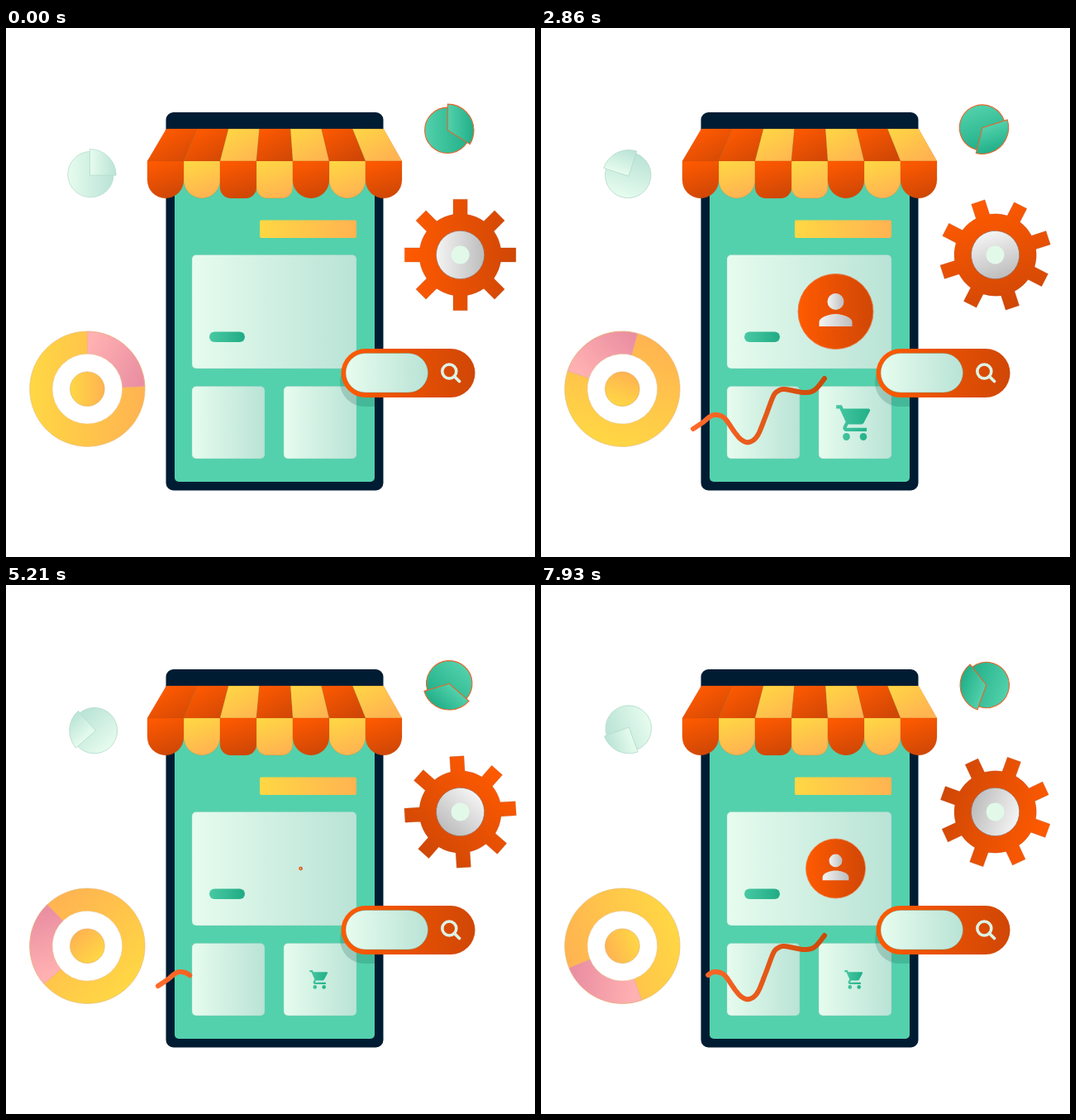
Write an HTML page with a canvas that moves like this. It is 640 px wide and 640 px high and loops after 8 s.

```html
<!DOCTYPE html>
<html lang="en">
<head>
<meta charset="utf-8">
<title>Mobile shop</title>
<style>
html, body { margin: 0; width: 100%; height: 100%; overflow: hidden; background: #fff; }
canvas { display: block; width: 640px; height: 640px; }
</style>
</head>
<body>
<canvas id="stage"></canvas>
<script>
const SIZE = 640, LOOP = 8000, FPS = 14;
const ORANGE = ['#ff5a00', '#d04706'];
const YELLOW = ['#ffd744', '#ffb351'];
const MINT = ['#e6fcee', '#b9e3d6'];
const GREEN = ['#52d1ab', '#1fae87'];
const PINK = ['#ffb0b1', '#ea8fa2'];
const GREY = ['#f4f4f4', '#bdbdbd'];

const canvas = document.getElementById('stage');
const ctx = canvas.getContext('2d');
const dpr = window.devicePixelRatio || 1;
canvas.width = canvas.height = SIZE * dpr;

const rad = deg => deg * Math.PI / 180;
const clamp = u => Math.max(0, Math.min(1, u));
const ease = (t, start, span) => {
  const u = clamp((t - start) / span);
  return u * u * (3 - 2 * u);
};

function grad([from, to], x0, y0, x1, y1) {
  const g = ctx.createLinearGradient(x0, y0, x1, y1);
  g.addColorStop(0, from);
  g.addColorStop(1, to);
  return g;
}

function box(x, y, w, h, r, fill) {
  ctx.beginPath();
  ctx.roundRect(x, y, w, h, r);
  ctx.fillStyle = fill;
  ctx.fill();
}

const boxH = (x, y, w, h, r, colors) => box(x, y, w, h, r, grad(colors, x, 0, x + w, 0));

function disc(x, y, r, fill) {
  ctx.beginPath();
  ctx.arc(x, y, r, 0, Math.PI * 2);
  ctx.fillStyle = fill;
  ctx.fill();
}

const discH = (x, y, r, colors) => disc(x, y, r, grad(colors, x - r, 0, x + r, 0));

function outline(color, width) {
  ctx.strokeStyle = color;
  ctx.lineWidth = width;
  ctx.stroke();
}

function at(x, y, deg, scale, draw) {
  ctx.save();
  ctx.translate(x, y);
  ctx.rotate(rad(deg));
  ctx.scale(scale, scale);
  draw();
  ctx.restore();
}

function phone() {
  box(193.5, 102, 263, 457.5, 9, '#001c33');
  box(204, 122, 242, 427, 5, '#53d1ac');
  boxH(307, 232.5, 117, 21.5, 2, YELLOW);
}

function card(x, y, w, h) {
  boxH(x, y, w, h, 5, MINT);
  outline('rgba(150,200,185,.6)', 0.6);
}

function awning() {
  for (let i = 0; i < 7; i++) {
    const top = 194 + i * 37.55, low = 171 + i * 44;
    const slant = i === 0 || i % 2 ? ORANGE : YELLOW;
    ctx.beginPath();
    ctx.moveTo(top, 122);
    ctx.lineTo(top + 37.55, 122);
    ctx.lineTo(low + 44, 161);
    ctx.lineTo(low, 161);
    ctx.closePath();
    ctx.fillStyle = grad(slant, top, 122, top + 26, 168);
    ctx.fill();
    outline('rgba(190,75,10,.35)', 0.5);
  }
  for (let i = 0; i < 7; i++) {
    const x = 171 + i * 44, r = i === 2 || i === 3 ? 13 : 22;
    box(x, 161, 44, 45, [0, 0, r, r], grad(i % 2 ? YELLOW : ORANGE, x + 8, 161, x + 22, 206));
    outline('rgba(190,90,20,.35)', 0.5);
  }
}

// Smooth curve through a few points, flattened with running lengths.
const knots = [[184, 485], [196, 477], [204, 470.5], [211, 468], [222, 472], [235, 490],
  [243, 498.5], [252, 501], [262, 493], [272, 469], [281, 445.5], [287, 439], [294, 437],
  [306, 439], [319, 441], [331, 438], [343, 424]];

function flatten(points) {
  const out = [];
  let length = 0;
  for (let i = 0; i < points.length - 1; i++) {
    const a = points[Math.max(0, i - 1)], b = points[i], c = points[i + 1];
    const d = points[Math.min(points.length - 1, i + 2)];
    for (let k = 0; k <= 10; k++) {
      const u = k / 10;
      const [x, y] = [0, 1].map(n => 0.5 * (2 * b[n] + (c[n] - a[n]) * u +
        (2 * a[n] - 5 * b[n] + 4 * c[n] - d[n]) * u * u +
        (3 * b[n] - a[n] - 3 * c[n] + d[n]) * u * u * u));
      const last = out[out.length - 1];
      if (last) length += Math.hypot(x - last.x, y - last.y);
      out.push({ x, y, length });
    }
  }
  return out;
}

const curve = flatten(knots);
const curveLength = curve[curve.length - 1].length;

function trendLine(t) {
  const phase = t % 4.78;
  const from = ease(phase, 2.84, 1.577), to = ease(phase, 0, 1.52);
  if (to - from < 0.001) return;
  ctx.save();
  ctx.beginPath();
  curve.forEach(p => ctx.lineTo(p.x, p.y));
  ctx.setLineDash([(to - from) * curveLength, curveLength * 2]);
  ctx.lineDashOffset = -from * curveLength;
  ctx.lineCap = ctx.lineJoin = 'round';
  outline(grad(['#ff6a2a', '#cc4808'], 184, 0, 346, 0), 6);
  ctx.restore();
}

// Grows, holds, shrinks, then rests hidden.
const POP = 6.94;
const popScale = (t, grow, shrink) => {
  const phase = t % POP;
  return ease(phase, grow, 1.4) - ease(phase, shrink, 1.565);
};

const personShape = new Path2D('M12 14c-2.67 0-8 1.34-8 4v2h16v-2c0-2.66-5.33-4-8-4z');

function avatar(t) {
  const s = popScale(t, 0, 3.864);
  if (s < 0.005) return;
  at(356.5, 343, 0, s, () => {
    discH(0, 0, 45.5, ORANGE);
    outline('#e8824f', 1);
    discH(0, -12, 10, GREY);
    ctx.translate(-30, -32);
    ctx.scale(2.5, 2.5);
    ctx.fillStyle = grad(GREY, 4, 0, 20, 0);
    ctx.fill(personShape);
  });
}

const cartShape = new Path2D('M1 2v2h2l3.6 7.6-1.35 2.45c-.16.3-.25.6-.25.95 0 1.1.9 2 2 2h12v-2H7.4' +
  'c-.15 0-.25-.1-.25-.25l.05-.12.9-1.63h7.45c.75 0 1.4-.4 1.75-1.03l3.58-6.5' +
  'c.08-.14.12-.3.12-.47 0-.55-.45-1-1-1H5.2l-.93-2z');

function cart(t) {
  const s = popScale(t, 0.258, 4.463);
  if (s < 0.005) return;
  at(378.7, 477.3, 0, s, () => {
    ctx.translate(-23.6, -25.4);
    ctx.scale(2.05, 2.13);
    const fill = grad(['#48c8a2', '#1fae87'], 1, 0, 22, 0);
    ctx.fillStyle = fill;
    ctx.fill(cartShape);
    disc(7, 20, 2.1, fill);
    disc(17, 20, 2.1, fill);
  });
}

function searchBar() {
  ctx.save();
  ctx.beginPath();
  ctx.rect(204, 122, 242, 427);
  ctx.clip();
  box(404, 399, 161, 59, 29.5, 'rgba(10,85,70,.2)');
  ctx.restore();
  boxH(405.5, 388, 162, 59, 29.5, ORANGE);
  boxH(411, 393.5, 99.5, 47.5, 23.75, MINT);
  outline('rgba(110,140,110,.55)', 0.7);
  ctx.beginPath();
  ctx.arc(536.3, 415.5, 8.5, 0, Math.PI * 2);
  outline('#dcf3e6', 3.6);
  ctx.beginPath();
  ctx.moveTo(542.5, 421.5);
  ctx.lineTo(548.5, 427.5);
  ctx.lineCap = 'round';
  outline('#dcf3e6', 3.8);
  ctx.lineCap = 'butt';
}

function slice(x, y, r, from, to) {
  ctx.beginPath();
  ctx.moveTo(x, y);
  ctx.arc(x, y, r, rad(from), rad(to));
  ctx.closePath();
}

function pie(x, y, turn, base, tip, sweep, colors, edge, width) {
  at(x, y, turn, 1, () => {
    discH(base[0], base[1], 27.7, colors);
    outline(edge, width);
    slice(tip[0], tip[1], 31.7, -90, -90 + sweep);
    ctx.fillStyle = grad(colors, tip[0], 0, tip[0] + 32, 0);
    ctx.fill();
    outline(edge, width);
  });
}

function donut(turn) {
  at(98.4, 436.7, turn, 1, () => {
    discH(0, 0, 69.7, YELLOW);
    outline('#e3b978', 0.6);
    slice(0, 0, 69.7, -90, -2.5);
    ctx.fillStyle = grad(PINK, 0, -45, 66, -12);
    ctx.fill();
    outline('#e9b08c', 0.6);
    disc(0, 0, 42.4, '#fff');
    outline('#e8c08a', 0.5);
    discH(0, 0, 20.8, YELLOW);
    outline('#e0ac5c', 0.6);
  });
}

function gear(turn) {
  at(549.6, 274.5, turn, 1, () => {
    const fill = grad(ORANGE, -67, 0, 67, 0);
    ctx.beginPath();
    for (let i = 0; i < 8; i++) {
      const a = rad(i * 45), c = Math.cos(a), s = Math.sin(a);
      for (const [u, v] of [[48.9, -8.6], [67.3, -8.6], [67.3, 8.6], [48.9, 8.6]]) {
        ctx.lineTo(u * c - v * s, u * s + v * c);
      }
      const half = Math.atan2(8.6, 48.9);
      ctx.arc(0, 0, 49.7, a + half, a + Math.PI / 4 - half);
    }
    ctx.closePath();
    ctx.fillStyle = fill;
    ctx.fill();
    outline('rgba(170,80,40,.5)', 0.5);
    discH(0, 0, 29.2, GREY);
    outline('#9a6a58', 0.7);
    disc(0, 0, 11, '#e2f9ea');
  });
}

function draw(t) {
  ctx.setTransform(dpr, 0, 0, dpr, 0, 0);
  ctx.fillStyle = '#fff';
  ctx.fillRect(0, 0, SIZE, SIZE);
  const turn = 25.2 * t;

  phone();
  awning();
  card(225, 274.5, 199, 137.5);
  card(225, 433.5, 88, 87.5);
  card(336, 433.5, 88, 87.5);
  boxH(246, 367.5, 43, 12.5, 6.25, ['#48c9a3', '#20ab85']);
  avatar(t);
  cart(t);
  trendLine(t);
  searchBar();

  pie(104.5, 175.6, -turn, [-2, 1.5], [-3, 2.6], 90, MINT, '#b5dccd', 0.8);
  pie(536.3, 122, turn, [-2, 1.8], [-2, 1.8], 122, GREEN, '#e8642c', 1.1);
  gear(turn);
  donut(-turn);
}

function tick(now) {
  const time = now % LOOP;
  draw(Math.floor((time + 6) * FPS / 1000) % (LOOP * FPS / 1000) / FPS);
  requestAnimationFrame(tick);
}

draw(0);
requestAnimationFrame(tick);
</script>
</body>
</html>
```
